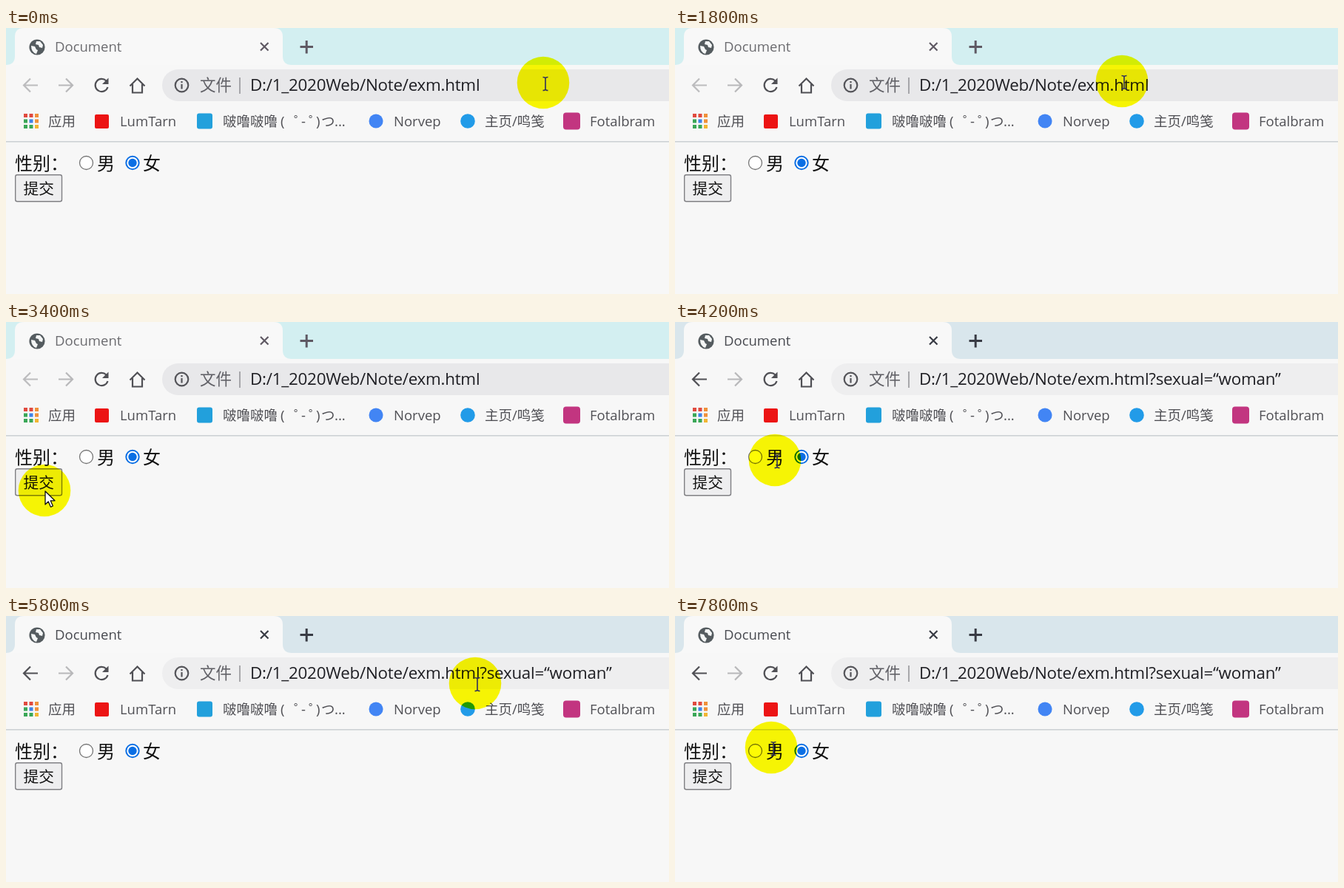
These frames come from a looping animation (896 px wide and 360 px high, 8 s). An HTML page:

```html
<!DOCTYPE html>
<html lang="zh">
<head>
<meta charset="utf-8">
<title>Document</title>
<style>
html, body { margin: 0; width: 100%; height: 100%; overflow: hidden; background: #f7f7f7; }
svg { display: block; width: 896px; height: 360px; }
text { font-family: "Open Sans", "Noto Sans CJK SC", "Noto Sans CJK", sans-serif; fill: #505055; font-size: 18.5px; }
.url { font-size: 22.35px; letter-spacing: -.24px; fill: #1f1f24; }
.page { font-family: "Noto Sans CJK SC", "Noto Sans CJK", sans-serif; font-size: 24px; fill: #111; }
.line { fill: none; stroke-width: 2.2; }
.bold { stroke-width: 3; }
.spot { mix-blend-mode: multiply; }
</style>
</head>
<body>
<svg viewBox="0 0 896 360">
  <rect width="896" height="360" fill="#f7f7f7"/>
  <rect id="strip" width="896" height="50"/>
  <path fill="#f8f8f8" d="M0 50Q12 50 12 38V12Q12 0 24 0H362Q374 0 374 12V38Q374 50 386 50Z"/>

  <circle cx="42" cy="26" r="10.6" fill="#555c60"/>
  <path fill="#f4f6f6" d="M34 24l5 1 2 4 2 1-2 5q-7-2-7-11zM41 18l5 0 4 5-1 4-4-1-1-3-4-1z"/>
  <text x="66" y="32" id="title">Document</text>
  <g id="tab">
    <path class="line" d="M344 20l10.500 10.500M354.500 20l-10.500 10.500"/>
    <path class="line bold" d="M397.500 25.500h17.500M406.200 17v17.500"/>
  </g>

  <path id="back" class="line" d="M43 77.500H25M33 68.500l-9 9 9 9"/>
  <path class="line" stroke="#b8b8ba" d="M71 77.500h18M81 68.500l9 9-9 9"/>
  <path class="line" stroke="#505055" d="M135.500 71.500A8.600 8.600 0 1 0 137.500 80"/>
  <path fill="#505055" d="M138.500 67.500v8.500h-8.500z"/>
  <path class="line" stroke="#505055" d="M167.500 78.500l10-10 10 10M171 76v11.500h13V76"/>

  <rect id="bar" x="211" y="56" width="720" height="43" rx="21.5"/>
  <circle class="line" cx="237.500" cy="77.500" r="8.800" stroke="#55555a"/>
  <path class="line" stroke="#55555a" d="M237.500 76v6.500M237.500 72v2.200"/>
  <text x="262" y="85" style="font-size:21.5px;fill:#606066">文件</text>
  <path stroke="#909095" stroke-width="1.500" d="M316 67v22"/>
  <text x="330" y="85" class="url" id="url"></text>

  <g id="apps"></g>
  <rect x="120" y="117" width="19" height="19" rx="2" fill="#ec1414"/>
  <rect x="258" y="115.500" width="21" height="21" rx="3" fill="#22a0dc"/>
  <circle cx="500" cy="126" r="9.500" fill="#4285f4"/>
  <circle cx="624" cy="126" r="9.800" fill="#229be8"/>
  <rect x="753" y="114.500" width="23" height="23" rx="4" fill="#c23580"/>
  <text x="57" y="133">应用</text>
  <text x="154" y="133">LumTarn</text>
  <text x="293" y="133">啵噜啵噜</text>
  <text y="133" x="371 389 399 409 419 426 444">(゜-゜)つ...</text>
  <text x="524" y="133">Norvep</text>
  <text x="647" y="133">主页/鸣笺</text>
  <text x="789" y="133">Fotalbram</text>
  <rect y="153" width="896" height="1.600" fill="#cdd2d5"/>

  <text class="page" x="12" y="192">性别：</text>
  <circle cx="108.500" cy="182.500" r="9" fill="#fff" stroke="#767676" stroke-width="1.300"/>
  <text class="page" x="123" y="192">男</text>
  <circle cx="171" cy="182.500" r="8.700" fill="#fff" stroke="#0b6fe4" stroke-width="2"/>
  <circle cx="171" cy="182.500" r="5.700" fill="#0b6fe4"/>
  <text class="page" x="185" y="192">女</text>
  <rect x="12.700" y="198.700" width="62.800" height="36" rx="2.500" fill="#eeeeef" stroke="#808084" stroke-width="1.400"/>
  <text class="page" x="23.500" y="225" style="font-size:20.7px">提交</text>

  <circle id="spot" class="spot" r="35.3" fill="#fefc04"/>
  <g id="pointer">
    <path id="beam" fill="none" stroke="#30305c" stroke-width="1.600" d="M-.5-7.500q3 0 3.500 1.500.5-1.500 3.500-1.500M3-6v15M-.5 10.500q3 0 3.500-1.500.5 1.500 3.500 1.500"/>
    <path id="arrow" fill="#fff" stroke="#111" stroke-width="1.300" stroke-linejoin="round" d="M1 1v18l4.200-4 3.200 7.300 3-1.300-3.200-7.200h5.800z"/>
  </g>
</svg>
<script>
const $ = id => document.getElementById(id);
const LOOP = 8000, STEP = 200, SUBMIT = 3600;
const PATH = "D:/1_2020Web/Note/exm.html";

// time, x, y of the pointer
const keys = [
  [0, 726, 74], [1800, 604, 72], [2800, 365, 182], [3400, 52, 228],
  [3600, 50, 232], [3800, 60, 214], [4200, 135, 187], [4800, 190, 172],
  [5800, 634, 91], [6600, 712, 75], [7000, 770, 76], [7800, 130, 178]
];

// colours before and after the form is sent
const looks = [
  { strip: "#d3eff1", bar: "#e8e8ea", tab: "#5f5963", title: "#6c6c70", back: "#bcbcbe", query: "" },
  { strip: "#d9e6ec", bar: "#eeeeef", tab: "#383b44", title: "#484a50", back: "#505055", query: "?sexual=“woman”" }
];

const dots = ["#e04a3f", "#e04a3f", "#f0913a", "#3aa757", "#3f83e8", "#f0913a", "#3aa757", "#3aa757", "#f2b632"];
$("apps").innerHTML = dots.map((c, i) =>
  `<rect x="${24 + i % 3 * 7.5}" y="${116 + Math.floor(i / 3) * 7.5}" width="5" height="5" fill="${c}"/>`).join("");

function pointerAt(t) {
  const next = keys.findIndex(k => k[0] > t);
  if (next < 0) return keys[keys.length - 1].slice(1);
  const [t0, x0, y0] = keys[next - 1], [t1, x1, y1] = keys[next];
  const u = (t - t0) / (t1 - t0), e = u * u * (3 - 2 * u);
  return [x0 + (x1 - x0) * e, y0 + (y1 - y0) * e];
}

function overText(x, y) {
  const inUrl = x > 258 && y > 56 && y < 99;
  const inLabel = y > 168 && y < 197 && (x < 84 || x > 120 && x < 150 || x > 182 && x < 210);
  return inUrl || inLabel;
}

function draw(time) {
  const t = Math.floor(time % LOOP / STEP) * STEP;
  const look = looks[t >= SUBMIT ? 1 : 0];
  const [x, y] = pointerAt(t);
  const beam = overText(x, y);

  $("strip").style.fill = look.strip;
  $("bar").style.fill = look.bar;
  $("title").style.fill = look.title;
  $("tab").style.stroke = look.tab;
  $("back").style.stroke = look.back;
  $("url").textContent = PATH + look.query;

  const place = `translate(${x.toFixed(1)} ${y.toFixed(1)})`;
  $("spot").setAttribute("transform", place);
  $("pointer").setAttribute("transform", place);
  $("beam").style.display = beam ? "" : "none";
  $("arrow").style.display = beam ? "none" : "";
}

const start = performance.now();
function tick() {
  draw(performance.now() - start);
  requestAnimationFrame(tick);
}
tick();
</script>
</body>
</html>
```
